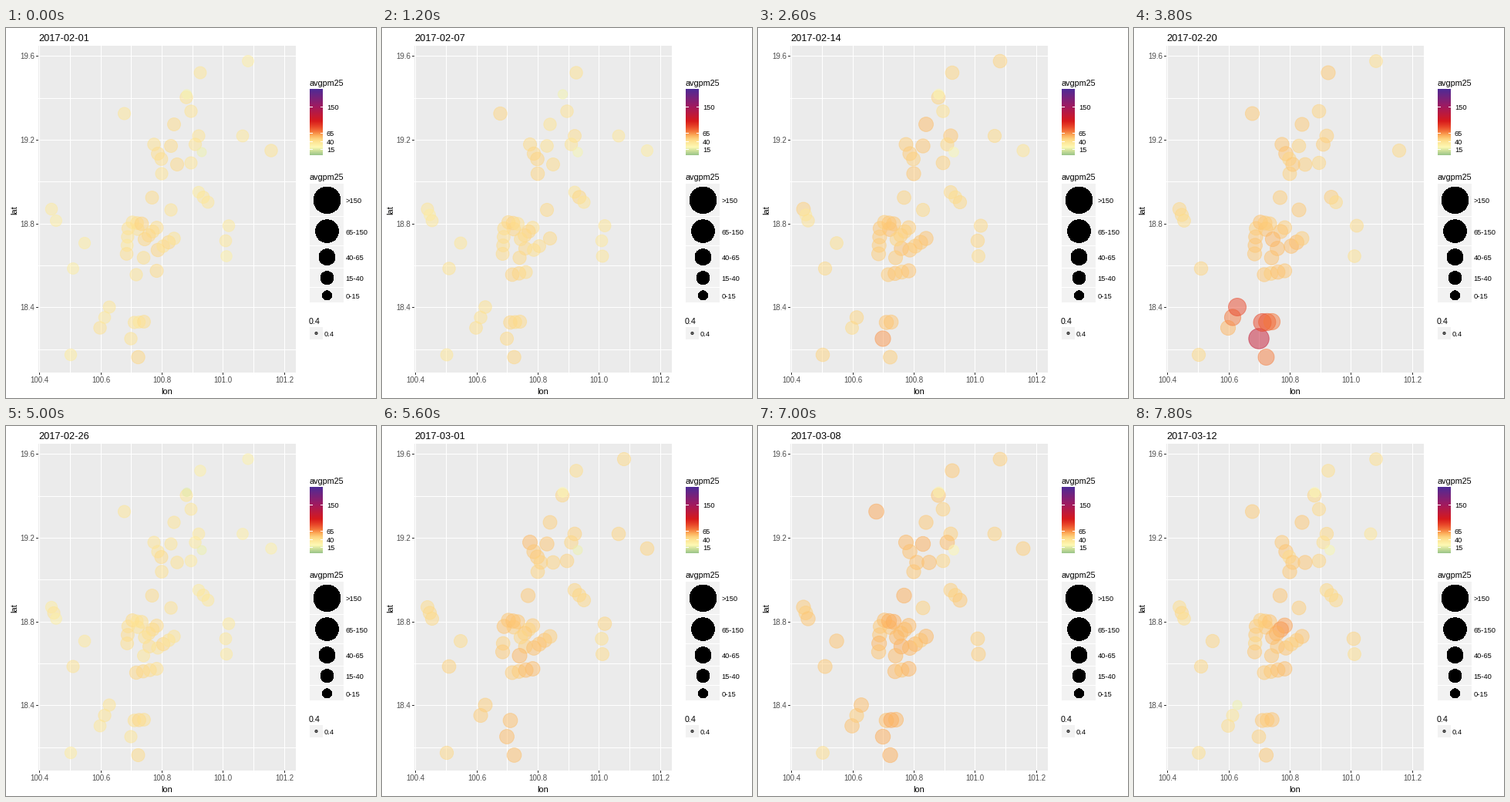
Recreate the animation shown at these times as a matplotlib script. Size 480 px wide and 480 px high, loop 8000 ms.

```python
import numpy as np
import matplotlib.pyplot as plt
from matplotlib.animation import FuncAnimation
from matplotlib.colors import LinearSegmentedColormap
from matplotlib.patches import Circle, Rectangle

SIZE, DPI, DAYS = 480, 80, 40
PT = 72 / DPI
plt.rcParams["font.family"] = "Liberation Sans"

# Stations standing alone, and rows of stations as (start, end, count).
SINGLES = [
    (314, 43), (252, 58), (234, 90), (240, 108), (153.5, 111), (218, 125),
    (250, 140), (307, 140), (245.5, 151), (214, 153), (344, 159), (192, 151),
    (240, 175), (222, 177), (202, 189), (189.5, 220), (214, 236),
    (289, 256.5), (285, 276), (286, 296), (102, 279), (87, 312), (84, 424),
    (162, 403), (171.5, 427), (171, 261), (186, 286), (178.5, 298),
]
ROWS = [
    ((197, 163), (206, 177), 3), ((250, 213), (262, 226), 3),
    ((59, 235), (65, 250), 3), ((158.5, 260), (156.5, 293), 4),
    ((164, 252), (176, 254), 3), ((195.5, 259), (180, 274), 4),
    ((197, 288), (218, 273), 4), ((169, 320), (195.5, 315), 4),
    ((122, 389), (134, 362), 3), ((166.5, 382), (179, 381), 3),
]
CLEAN = [(234.5, 86), (254, 161)]
POS = np.vstack([SINGLES] + [np.linspace(a, b, n) for a, b, n in ROWS]
                + [CLEAN])
X, Y = POS.T

# Usual level over the days, and local flares: day, x, y, reach, gain.
BASE = {0: 37, 6: 40, 13: 46, 19: 47, 25: 37, 31: 56, 39: 46}
FLARES = [
    (19, 162, 403, 18, 70), (19, 134, 362, 13, 42), (31, 168, 400, 26, 28),
    (31, 134, 362, 12, 24), (31, 195, 315, 10, 45), (31, 158, 266, 14, 18),
    (13, 162, 403, 10, 15), (39, 195, 262, 12, 12), (39, 134, 362, 10, -26),
]

ALPHA, LOW, HIGH = 0.5, -5, 205
STOPS = [(-5, "#9cc68a"), (8, "#cde09a"), (20, "#fdf9b4"), (38, "#fee391"),
         (47, "#fed07c"), (57, "#fdb05c"), (70, "#f4793c"), (85, "#e9482a"),
         (103, "#d7191c"), (150, "#a01a60"), (205, "#4e2b96")]
CMAP = LinearSegmentedColormap.from_list(
    "pm", [((v - LOW) / (HIGH - LOW), c) for v, c in STOPS], N=512)


def radius(v):
    return 1.9 + 1.06 * np.sqrt(v)


def day_data(day):
    """Level of every station and whether it reports on that day."""
    rng = np.random.default_rng(100 + day)
    level = np.interp(day, list(BASE), list(BASE.values()))
    level = level + 8 * np.exp(-((X - 185) / 60) ** 2) - 5
    level += 2.5 * rng.standard_normal(len(POS))
    for when, x, y, reach, gain in FLARES:
        near = np.exp(-((X - x) ** 2 + (Y - y) ** 2) / (2 * reach ** 2))
        level += gain * near * np.exp(-((day - when) / 2) ** 2)
    level[-len(CLEAN):] *= 0.45
    on = (rng.random(len(POS)) < 0.93) | (level > 65)
    return np.clip(level, 5, 200), on


fig = plt.figure(figsize=(SIZE / DPI, SIZE / DPI), dpi=DPI, facecolor="white")
ax = fig.add_axes([0, 0, 1, 1])
ax.axis("off")


def rect(x0, y0, x1, y1, color, z=1):
    ax.add_patch(Rectangle((x0, y0), x1 - x0, y1 - y0, fc=color, lw=0,
                           zorder=z, antialiased=False))


def text(x, y, s, size, color="black", **kw):
    return ax.text(x, y, s, fontsize=size * PT, color=color,
                   va="baseline", **kw)


def dot(x, y, r, **kw):
    ax.add_patch(Circle((x, y), r, zorder=4, **kw))


# Panel, grid and axes
LEFT, TOP, RIGHT, BOTTOM = 42, 23, 376, 447
INK, TICK = "#4d4d4d", "#333333"
rect(LEFT, TOP, RIGHT, BOTTOM, "#ebebeb")
for i in range(9):
    x = round(43.1 + 39.72 * i)
    rect(x, TOP, x + 1, BOTTOM, "white", 2)
    if i % 2 == 0:
        rect(x, BOTTOM, x + 1, BOTTOM + 3, TICK)
        text(x + 0.5, 460.5, f"{100.4 + i / 10:.1f}", 9.7, INK, ha="center")
for i in range(8):
    y = round(36.4 + 54.33 * i)
    rect(LEFT, y, RIGHT, y + 1, "white", 2)
    if i % 2 == 0:
        rect(LEFT - 3, y, LEFT, y + 1, TICK)
        text(37, y + 4, f"{19.6 - i / 5:.1f}", 9.7, INK, ha="right")
text(209, 475, "lon", 11, ha="center")
ax.text(16.5, 236, "lat", fontsize=11 * PT, rotation=90, ha="right",
        va="center")
title = text(42, 17, "", 12.7)

# Colour legend
text(393, 75, "avgpm25", 10.7)
ax.imshow(np.linspace(1, 0, 172)[:, None], cmap=CMAP, vmin=0, vmax=1,
          extent=(394, 411, 165, 79), aspect="auto", zorder=2)
for v in (15, 40, 65, 150):
    y = round(163 - 0.41 * v)
    rect(394, y, 397.5, y + 1, "white", 3)
    rect(407.5, y, 411, y + 1, "white", 3)
    text(416, y + 4, str(v), 9.3)

# Size legend: each key is as tall as its dot needs
text(393, 197, "avgpm25", 10.7)
top = 202
for label, r in ((">150", 17.2), ("65-150", 14.8), ("40-65", 10.4),
                 ("15-40", 8.4), ("0-15", 6)):
    height = max(2 * r + 8.3, 18.5)
    mid = top + height / 2
    rect(394, round(top), 438, round(top + height) - 1, "#f2f2f2")
    dot(416.5, mid, r, fc="black", lw=0, antialiased=False)
    text(440.5, mid + 4, label, 9.3)
    top += height

# Opacity legend
text(393, 384, "0.4", 10.7)
rect(394, 388, 411, 404, "#f2f2f2")
dot(402.5, 396, 1.6, fc=(0, 0, 0, ALPHA), ec=(0, 0, 0, 0.75), lw=PT)
text(413, 400, "0.4", 9.3)

points = ax.scatter([], [], linewidths=PT, zorder=5)
ax.set_xlim(0, SIZE)
ax.set_ylim(SIZE, 0)


def update(day):
    level, on = day_data(day)
    v = level[on]
    rgba = CMAP((v - LOW) / (HIGH - LOW))
    rgba[:, 3] = ALPHA
    points.set_offsets(POS[on])
    points.set_sizes((2 * (radius(v) - 0.2) * PT) ** 2)
    points.set_facecolors(rgba)
    points.set_edgecolors(rgba)
    month, date = (2, day + 1) if day < 28 else (3, day - 27)
    title.set_text(f"2017-{month:02d}-{date:02d}")
    return points, title


anim = FuncAnimation(fig, update, frames=DAYS, interval=200, repeat=True,
                     repeat_delay=0, init_func=lambda: update(0))
plt.show()
```
